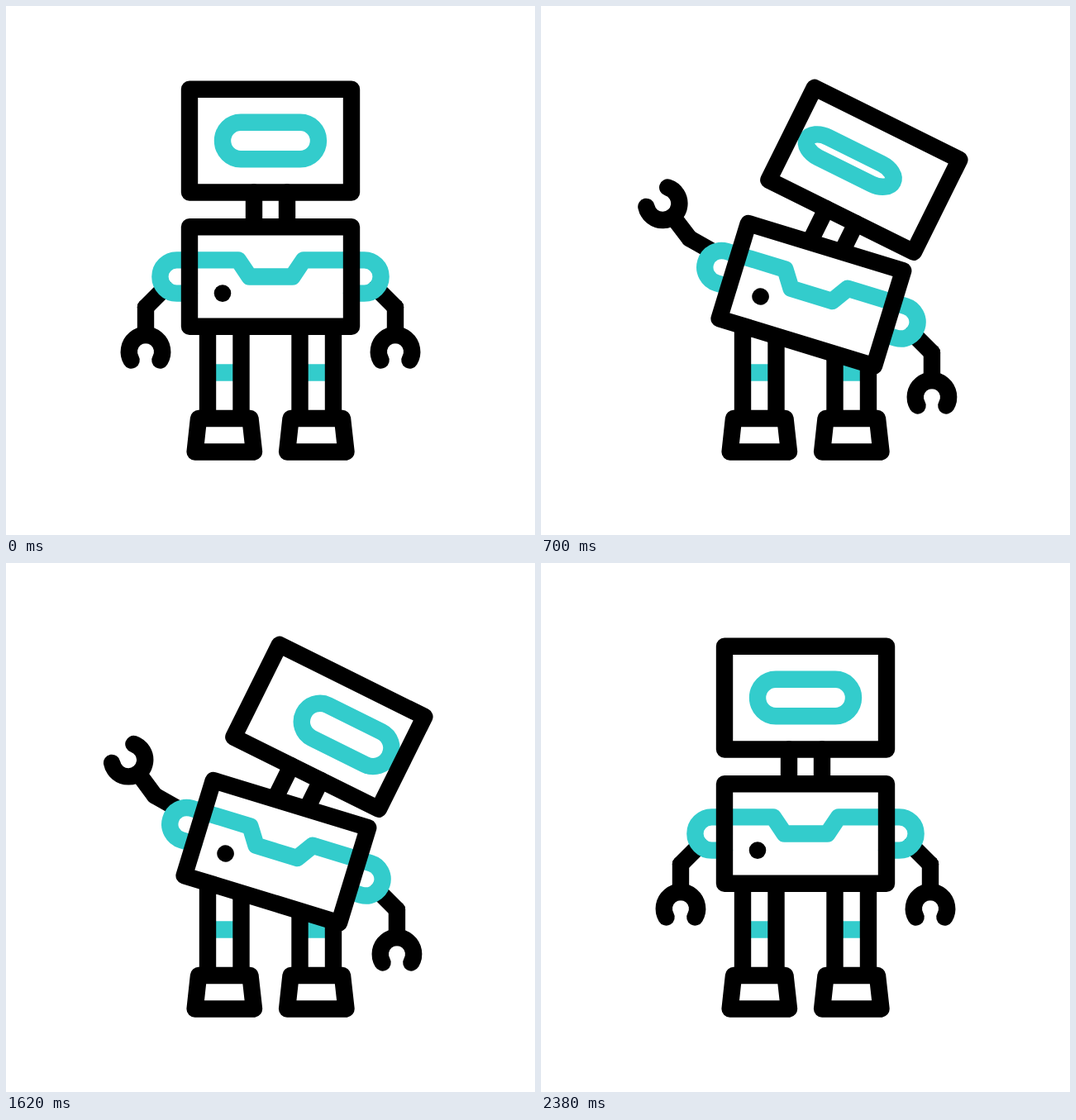
Animation of 640x640 px, one loop 2400 ms. Source, as an HTML page:

```html
<!DOCTYPE html>
<html lang="en">
<head>
<meta charset="utf-8">
<title>Waving robot</title>
<style>
  html, body { margin: 0; width: 100%; height: 100%; overflow: hidden; background: #fff; }
  svg { display: block; width: 100vw; height: 100vh; }
  .line { fill: none; stroke: #000; stroke-width: 20.4; stroke-linecap: round; stroke-linejoin: round; }
  .teal { stroke: #3cc; }
  .flat { stroke-linecap: butt; }
  .panel { fill: #fff; }
</style>
</head>
<body>
<svg viewBox="0 0 640 640">
  <defs>
    <path id="upper" d="M192 341.5L169 364.5"/>
    <path id="fore" d="M169 364.5V398"/>
    <path id="claw" d="M151.6 428.5A20.2 20.2 0 1 1 186.4 428.5"/>
    <g id="leg">
      <path class="line teal flat" d="M244 443.5H284.5"/>
      <path class="line" d="M244 387.5V499M284.5 387.5V499M233 499H295.5L300 539.5H228.6Z"/>
    </g>
  </defs>
  <use href="#leg"/>
  <use href="#leg" x="111.5"/>
  <g id="body">
    <g class="line">
      <g id="leftArm">
        <use href="#upper"/>
        <g id="leftFore">
          <use href="#fore"/>
          <use id="leftClaw" href="#claw"/>
        </g>
      </g>
      <g id="rightArm">
        <g transform="matrix(-1 0 0 1 640 0)">
          <use href="#upper"/>
          <use href="#fore"/>
          <use href="#claw"/>
        </g>
      </g>
    </g>
    <g id="head">
      <path class="line" d="M300 225.5V267.3M340 225.5V267.3"/>
      <rect id="eye" class="line teal" width="116" rx="22"/>
      <rect class="line" x="222" y="100.7" width="196" height="124.8"/>
    </g>
    <rect class="panel" x="222" y="267.3" width="196" height="120.4"/>
    <path class="line teal" d="M222 347.6H206.5A20.1 20.1 0 0 1 206.5 307.4H281L294.5 327.5H346.5L360 307.4H433.5A20.1 20.1 0 0 1 433.5 347.6H418"/>
    <circle cx="262" cy="347.6" r="10.3"/>
    <rect class="line" x="222" y="267.3" width="196" height="120.4"/>
  </g>
</svg>
<script>
const LOOP = 2400;
const $ = id => document.getElementById(id);
const turn = (id, angle, x, y) => $(id).setAttribute('transform', `rotate(${angle} ${x} ${y})`);

// Cubic ease in and out, clamped to 0..1
function ease(u) {
  u = Math.min(1, Math.max(0, u));
  return u < .5 ? 4 * u ** 3 : 1 - 4 * (1 - u) ** 3;
}

// Rises to 1 from time `on`, falls back to 0 from time `off`
const pulse = (t, on, off, span = 530) => ease((t - on) / span) - ease((t - off) / span);

function draw(t) {
  const lean = pulse(t, 0, 1873);
  const bend = pulse(t, 530, 1620, 230);
  const wave = pulse(t, 740, 1260, 380);
  const lookLeft = pulse(t, 0, 860);
  const lookRight = pulse(t, 860, 1636);
  const blink = pulse(t, 530, 695, 165);

  turn('body', 17 * lean, 250.7, 361.5);
  turn('head', 9.4 * lean, 320.5, 267.2);
  turn('leftArm', 57.5 * lean + 28.5 * wave, 218, 326.5);
  turn('leftFore', 53 * lean + 16 * bend, 169, 364.5);
  turn('leftClaw', -4.5 * lean, 169, 418.3);
  turn('rightArm', 10 * wave - 17 * lean, 433.5, 327.5);

  const height = 44.4 - 17 * blink;
  const box = {
    x: 262 - 20.3 * lookLeft + 23.3 * lookRight,
    y: 163 - 2.3 * lookLeft - .7 * lookRight - height / 2,
    height,
    ry: height / 2
  };
  for (const name in box) $('eye').setAttribute(name, box[name]);
}

const start = performance.now();
function tick() {
  draw((performance.now() - start) % LOOP);
  requestAnimationFrame(tick);
}
tick();
</script>
</body>
</html>
```
